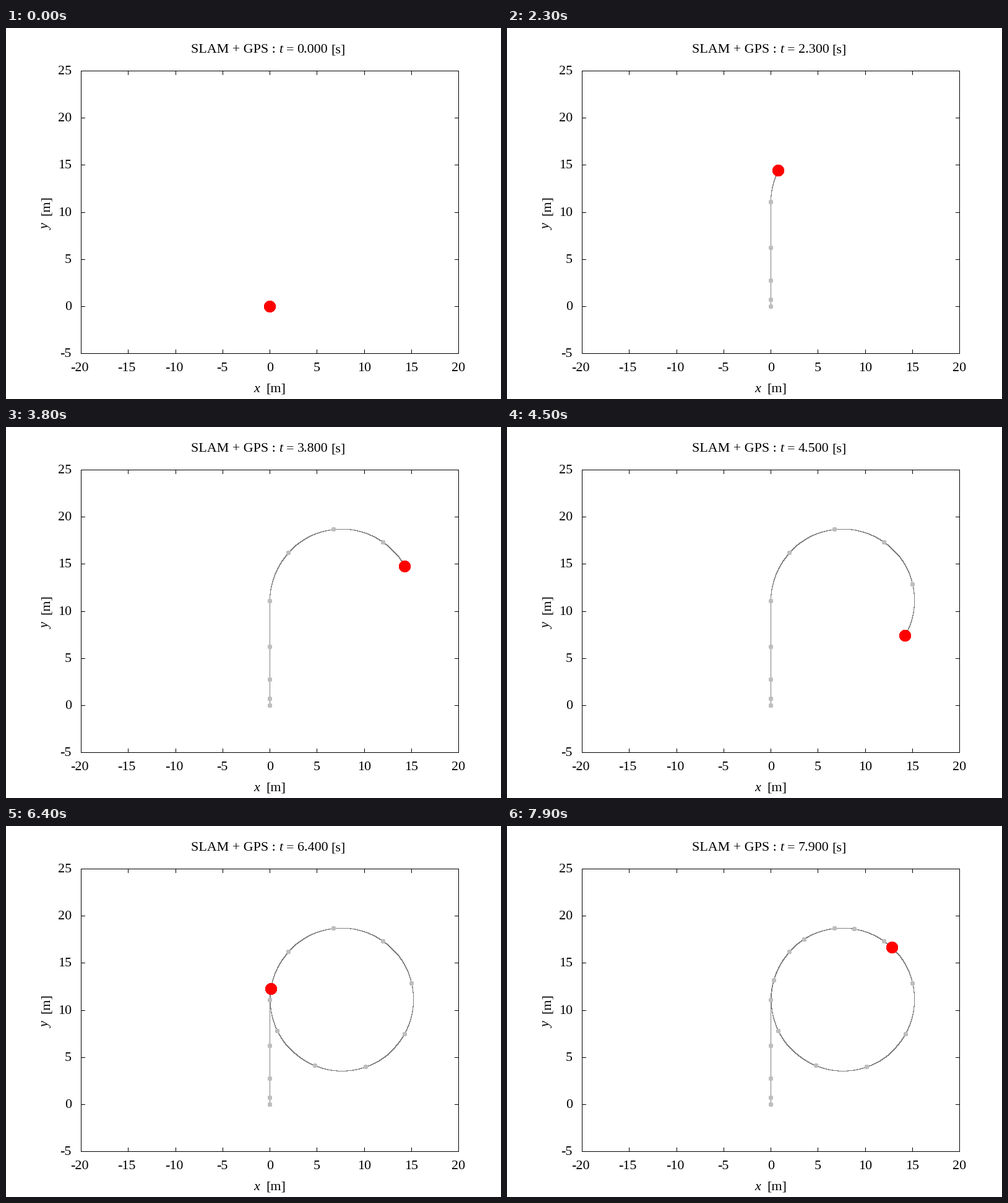
Recreate the animation shown at these times as a matplotlib script. Size 800 by 600 pixels, loop 8000 ms.

```python
import numpy as np
import matplotlib.pyplot as plt
from matplotlib.animation import FuncAnimation
from matplotlib.patches import Circle

plt.rcParams["path.simplify"] = False

DPI = 100
PX = 72 / DPI              # points per pixel
FONT = dict(family="Liberation Serif", size=22 * PX, color="black")
FRAMES, STEP = 80, 0.1
T_TURN = 2.0               # start of the turn, s
ACCEL = 5.556              # m/s^2
RADIUS, RATE = 7.59, 1.457 # m, rad/s
LEAD = 0.012               # the vehicle runs slightly ahead of its log


def path(t):
    """Speed up straight ahead, then circle clockwise."""
    t = np.asarray(t, float)
    a = RATE * np.maximum(t - T_TURN, 0)
    drift = np.minimum(a, 1)
    x = RADIUS * (1 - np.cos(a)) + 0.04 * drift
    y = ACCEL / 2 * np.minimum(t, T_TURN) ** 2 + RADIUS * np.sin(a) + 0.025 * drift
    return x, y


def to_px(x, y):
    """Metres to the centre of the nearest stage pixel."""
    px = np.floor(121 + (np.asarray(x) + 20) * 15.25 + 0.5) + 0.5
    py = np.floor(526 - (np.asarray(y) + 5) * 457 / 30 + 0.5) + 0.5
    return px, py


def pixel_chain():
    """Rows of (x, y, time): the path as a one-pixel chain without elbows."""
    times = np.arange(0, FRAMES * STEP, 0.002)
    chain = []
    for x, y, t in zip(*to_px(*path(times)), times):
        if chain and (x, y) == chain[-1][:2]:
            continue
        if len(chain) > 1 and max(abs(x - chain[-2][0]), abs(y - chain[-2][1])) <= 1:
            chain.pop()
        chain.append((x, y, t))
    return np.array(chain)


fig = plt.figure(figsize=(800 / DPI, 600 / DPI), dpi=DPI, facecolor="white")
ax = fig.add_axes([0, 0, 1, 1])
ax.set_xlim(0, 800)
ax.set_ylim(600, 0)
ax.axis("off")


def stroke(xs, ys, color="black", z=1, join="miter"):
    return ax.plot(xs, ys, color=color, lw=PX, antialiased=False, snap=False,
                   solid_capstyle="projecting", solid_joinstyle=join, zorder=z)[0]


def disc(t, radius, color, z):
    return ax.add_patch(Circle(to_px(*path(t)), radius, fc=color, lw=0,
                               antialiased=False, snap=False, zorder=z))


def label(x, y, s, ha="left", **kw):
    return ax.text(x, y, s, ha=ha, va="baseline", **FONT, **kw)


def draw_axes():
    left, right, top, bottom = 121.5, 731.5, 69.5, 526.5
    for v in range(-20, 21, 5):
        x = float(to_px(v, 0)[0])
        stroke([x, x], [bottom, bottom - 6])
        stroke([x, x], [top, top + 6])
        shift = 0 if v >= 0 else (-1.5 if v == -5 else -2.7)
        label(x + shift, 555, str(v), "center")
    for v in range(-5, 26, 5):
        y = float(to_px(0, v)[1])
        stroke([left, left + 6], [y, y])
        stroke([right, right - 6], [y, y])
        label(106, y + 5.3, str(v), "right")
    stroke([left, right, right, left, left], [top, top, bottom, bottom, top])

    label(400, 589, "x", style="italic")
    label(420, 589, "[m]")
    up = dict(rotation=90, rotation_mode="anchor")
    label(70, 325.5, "y", style="italic", **up)
    label(70, 303, "[m]", **up)

    label(299, 40, "SLAM + GPS :")
    label(441, 40, "t", style="italic")
    label(452.6, 40, "=")
    label(525.5, 40, "[s]")


draw_axes()
clock = label(470.5, 40, "")
chain = pixel_chain()
trail = stroke([], [], "#7f7f7f", 2, "round")
log_times = np.arange(0, FRAMES * STEP, 0.5)
marks = [disc(t, 3.03, "#bebebe", 3) for t in log_times]
ball = disc(0, 9.02, "#ff0000", 4)


def update(i):
    t = i * STEP
    clock.set_text(f"{t:.3f}")
    done = chain[chain[:, 2] <= t]
    trail.set_data(done[:, 0], done[:, 1])
    for mark, logged in zip(marks, log_times):
        mark.set_visible(logged <= t + 1e-6)
    ball.center = to_px(*path(t + LEAD))
    return (clock, trail, *marks, ball)


anim = FuncAnimation(fig, update, frames=FRAMES, interval=100,
                     repeat=True, repeat_delay=0, blit=False)
plt.show()
```
